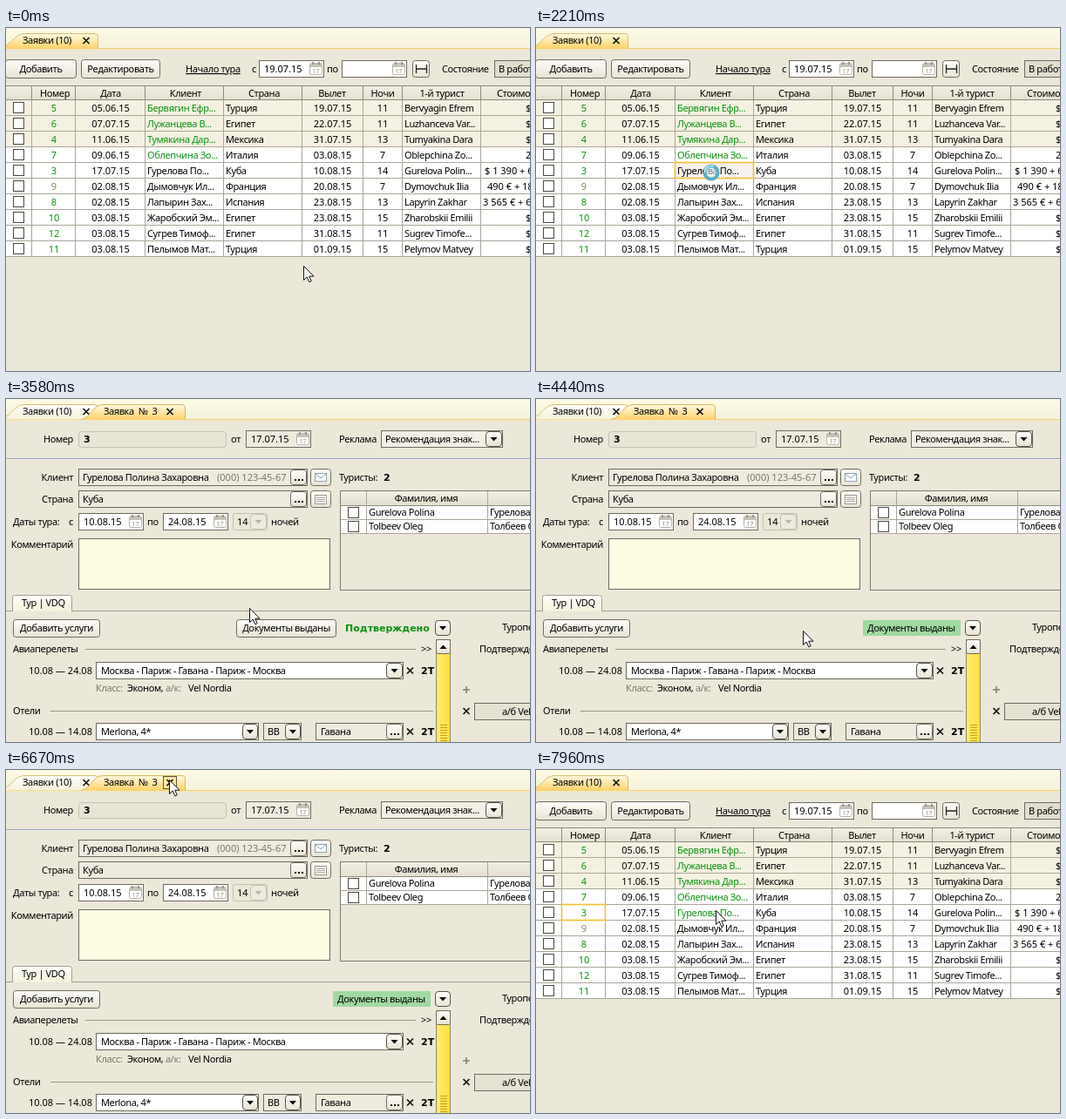
These frames come from a looping animation (601x394 px, 8 s). An HTML page:

```html
<!DOCTYPE html>
<html lang="ru">
<head>
<meta charset="utf-8">
<title>Заявки</title>
<style>
html, body { margin: 0; width: 100%; height: 100%; overflow: hidden; background: #ebe7d9; }
svg { display: block; width: 601px; height: 394px; }
text { font: 11px "Noto Sans", "Open Sans", sans-serif; fill: #000; white-space: pre; }
.w { letter-spacing: -.38px; }
.m { text-anchor: middle; }
.e { text-anchor: end; }
.b { font: bold 11px "DejaVu Sans", sans-serif; letter-spacing: 0; }
.grey { fill: #7b7768; }
.green { fill: #0a920f; }
.olive { fill: #92815a; }
.u { text-decoration: underline; }
.tiny { font-size: 7px; fill: #8a877c; }
</style>
</head>
<body>
<svg id="stage" viewBox="0 0 601 394"></svg>
<script>
const LOOP = 8000;
const BG = '#ebe7d9', EDGE = '#6d6a5f', PALE = '#c6c2b2', GOLD = '#efc02f';

// Drawing helpers
const text = (x, y, s, cls = '') =>
  `<text x="${x}" y="${y}" class="${/[a-zа-я]/i.test(s) ? 'w ' : ''}${cls}">${s}</text>`;
const fill = (x, y, w, h, color) =>
  `<rect x="${x}" y="${y}" width="${w}" height="${h}" fill="${color}"/>`;
const box = (x, y, w, h, color = '#fff', edge = EDGE, r = 0) =>
  `<rect x="${x + .5}" y="${y + .5}" width="${w - 1}" height="${h - 1}" rx="${r}" fill="${color}" stroke="${edge}"/>`;
const path = (d, color = 'none', edge = 'none', width = 1) =>
  `<path d="${d}" fill="${color}" stroke="${edge}" stroke-width="${width}"/>`;
const hline = (x, y, w, color = '#aaa698') => fill(x, y, w, 1, color);
const vline = (x, y, h, color = '#aaa698') => fill(x, y, 1, h, color);
const group = (id, content) => `<g id="${id}">${content}</g>`;

const cross = (x, y, r = 3.5, color = '#111') =>
  path(`M${x - r} ${y - r}l${2 * r} ${2 * r}m0 ${-2 * r}l${-2 * r} ${2 * r}`, 'none', color, 1.7);
const button = (x, y, w, h, label = '', color = 'url(#raised)') =>
  box(x, y, w, h, color, EDGE, 3) + text(x + w / 2, Math.floor(y + h / 2 + 4), label, 'm');
const arrowButton = (x, y, w, h, enabled = true) =>
  box(x, y, w, h, enabled ? 'url(#raised)' : '#eeeadd', enabled ? '#55534a' : PALE, 3.5) +
  path(`M${x + w / 2 - 4} ${y + h / 2 - 2}h8l-4 4.5z`, enabled ? '#000' : '#bab6a8');
const dotsButton = (x, y) => button(x, y, 19, 18) +
  [5, 9, 13].map(d => fill(x + d, y + 11, 2, 2, '#000')).join('');
const checkbox = (x, y) => box(x, y, 13, 13, '#fff', '#4b4a45');
const calendar = (x, y) => box(x, y, 15, 14, '#fff', '#b5b2a7', 2) +
  fill(x + 1, y + 1, 13, 4, '#c5c2b8') + fill(x + 3, y - 1, 2, 3, '#99968b') +
  fill(x + 10, y - 1, 2, 3, '#99968b') + text(x + 7.5, y + 12, '17', 'm tiny');
const dateField = (x, y, date, color) =>
  box(x, y, 75, 20, color) + text(x + 6, y + 14, date) + calendar(x + 58, y + 3);
const closeMark = x => cross(x, 14.5);

const strip = fill(0, 0, 601, 24, 'url(#strip)') + hline(0, 23, 601, '#efcf78') +
  hline(0, 24, 601, '#f6e8bd');
const firstTab = color =>
  path('M-2 23.5V21C8 17 10 6.5 22 6.5H102Q105.5 6.5 105.5 10V23.5', color, '#d6bd73') +
  text(19, 18, 'Заявки (10)') + closeMark(92);

// Booking list
const COLUMNS = [29, 79, 159, 249, 339, 409, 454, 544];
const HEADERS = [[56, 'Номер'], [120, 'Дата'], [206, 'Клиент'], [296, 'Страна'],
  [374, 'Вылет'], [432, 'Ночи'], [500, '1-й турист']];
const BOOKINGS = [
  [5, '05.06.15', 'Бервягин Ефр...', 'Турция', '19.07.15', 11, 'Bervyagin Efrem', 596, '$'],
  [6, '07.07.15', 'Лужанцева В...', 'Египет', '22.07.15', 11, 'Luzhanceva Var...', 596, '$'],
  [4, '11.06.15', 'Тумякина Дар...', 'Мексика', '31.07.15', 13, 'Tumyakina Dara', 596, '$'],
  [7, '09.06.15', 'Облепчина Зо...', 'Италия', '03.08.15', 7, 'Oblepchina Zo...', 596, '2'],
  [3, '17.07.15', 'Гурелова По...', 'Куба', '10.08.15', 14, 'Gurelova Polin...', 549, '$ 1 390 + 6'],
  [9, '02.08.15', 'Дымовчук Ил...', 'Франция', '20.08.15', 7, 'Dymovchuk Ilia', 552, '490 € + 18'],
  [8, '02.08.15', 'Лапырин Зах...', 'Испания', '23.08.15', 13, 'Lapyrin Zakhar', 547, '3 565 € + 6'],
  [10, '03.08.15', 'Жаробский Эм...', 'Египет', '23.08.15', 15, 'Zharobskii Emilii', 596, '$'],
  [12, '03.08.15', 'Сугрев Тимоф...', 'Египет', '31.08.15', 11, 'Sugrev Timofe...', 596, '$'],
  [11, '03.08.15', 'Пелымов Мат...', 'Турция', '01.09.15', 15, 'Pelymov Matvey', 596, '$'],
];

const rowTop = i => 83 + 18 * i;
const rowBack = (_, i) =>
  fill(0, rowTop(i), 601, 17, i < 3 ? '#f4f1e2' : '#fff') + hline(0, rowTop(i) + 17, 601);
const cellMark = (id, x, y, w, color) => group(id,
  `<rect x="${x + .5}" y="${y + .5}" width="${w}" height="18" fill="${color}" stroke="${GOLD}" stroke-width="1.6"/>`);
const rowCells = ([id, date, client, country, flight, nights, tourist, priceX, price], i) => {
  const top = rowTop(i), y = top + 13;
  const marks = cellMark('picked', 159, top - 1, 90, '#f6f1ed') +
    cellMark('visited', 29, top - 1, 50, '#fff');
  return (id === 3 ? marks : '') +
    checkbox(8, top + 2) + text(55, y, id, 'm ' + (id === 9 ? 'olive' : 'green')) +
    text(120, y, date, 'm') +
    `<g${id === 3 ? ' id="client"' : ''}>${text(162, y, client, i < 4 ? 'green' : '')}</g>` +
    text(252, y, country) + text(374.5, y, flight, 'm') + text(432, y, nights, 'm') +
    text(457, y, tourist) + text(priceX, y, price);
};

const listScreen = strip + firstTab('url(#active)') +
  button(-1, 36, 82, 22, 'Добавить') + button(86, 36, 91, 22, 'Редактировать') +
  text(206, 51, 'Начало тура', 'u') + text(282, 51, 'с') + dateField(290, 37, '19.07.15') +
  text(368, 51, 'по') + dateField(385, 37, '') + button(466, 37, 20, 20) +
  path('M470.5 42v10M482.5 42v10M471 47h11', 'none', '#222', 1.3) +
  text(500, 51, 'Состояние') + box(560, 37, 60, 20, '#e2decf') + text(565, 51, 'В работе') +
  fill(0, 66, 601, 17, 'url(#head)') + hline(0, 66, 601, '#8d8a7e') + hline(0, 82, 601, '#8d8a7e') +
  HEADERS.map(([x, s]) => text(x, 79, s, 'm')).join('') + text(563, 79, 'Стоимость') +
  BOOKINGS.map(rowBack).join('') +
  COLUMNS.map(x => vline(x, 66, 17, '#8d8a7e') + vline(x, 83, 180)).join('') +
  BOOKINGS.map(rowCells).join('');

// Booking card
const section = (y, label, x, w) => text(8, y + 4, label) + hline(x, y, w, '#9b988b');
const touristRow = (y, latin, native) => fill(384, y, 217, 15, '#fff') + hline(384, y + 15, 217) +
  checkbox(392, y + 1) + text(416, y + 11, latin) + text(555, y + 11, native);
const label = (y, s) => text(77, y, s, 'e');

const cardScreen = strip + firstTab('url(#idle)') +
  path('M86 23.5C98 22 98 6.5 112 6.5H202Q205.5 6.5 205.5 10V23.5', 'url(#active)', '#d6b75c') +
  text(112, 18, 'Заявка  №  3') +
  group('closeHover', box(180, 7, 16, 15, '#ffe9a6', '#5c5646')) + closeMark(188) +
  hline(0, 68, 601, '#8ba3b8') + hline(0, 69, 601, '#f6f4ea') +
  label(50, 'Номер') + box(83, 37, 170, 19, '#e9e5d6', PALE, 3) + text(89, 50, '3', 'b') +
  text(258, 50, 'от') + dateField(275, 36, '17.07.15', '#efecdf') +
  text(382, 50, 'Реклама') + box(430, 36, 140, 20, '#f2efe4') + text(435, 50, 'Рекомендация знак...') +
  arrowButton(550, 37, 19, 18) +

  label(94, 'Клиент') + box(83, 80, 263, 20, '#eeebde') +
  text(88, 94, 'Гурелова Полина Захаровна') + text(242, 94, '(000) 123-45-67', 'grey') +
  dotsButton(326, 81) + button(349, 80, 24, 20) +
  box(354, 85, 14, 10, '#fff', '#89a3b3') + path('M355 86l6 5 6-5', 'none', '#89a3b3') +
  label(119, 'Страна') + box(83, 105, 263, 20, '#eeebde') + text(88, 119, 'Куба') +
  dotsButton(326, 106) + button(349, 105, 24, 20) +
  box(354, 110, 14, 11, '#fff', '#99968b') +
  [113, 115, 117].map(y => hline(356, y, 10, '#a9a69b')).join('') +
  text(8, 145, 'Даты тура:') + label(145, 'с') + dateField(83, 131, '10.08.15') +
  text(162, 145, 'по') + dateField(180, 131, '24.08.15') +
  box(260, 131, 40, 20, BG, PALE, 2) + text(265, 145, '14') +
  arrowButton(280, 132, 19, 18, false) + text(304, 145, 'ночей') +
  label(171, 'Комментарий') + box(83, 160, 289, 59, '#fdfce2') +

  text(382, 94, 'Туристы:') + text(433, 94, '2', 'b') +
  box(383, 105, 230, 115, BG, '#7d7a6e') + fill(384, 106, 217, 16, 'url(#head)') +
  hline(384, 122, 217, '#8d8a7e') + text(482, 118, 'Фамилия, имя', 'm') +
  touristRow(123, 'Gurelova Polina', 'Гурелова П') + touristRow(139, 'Tolbeev Oleg', 'Толбеев Ол') +
  vline(413, 106, 49) + vline(552, 106, 49) +

  hline(0, 243, 601, '#a29f92') +
  path('M7.5 244V228.5Q7.5 225.5 10.5 225.5H72.5Q75.5 225.5 75.5 228.5V244', 'url(#idle)', '#a29f92') +
  text(18, 238, 'Тур | VDQ') + button(8, 253, 100, 21, 'Добавить услуги') +
  group('pending', button(264, 253, 115, 21, 'Документы выданы') +
    group('issueHover', button(264, 253, 115, 21, 'Документы выданы', '#fff1bd')) +
    group('issueDown', button(264, 253, 115, 21, 'Документы выданы', '#dcd6bf')) +
    text(389, 267, 'Подтверждено', 'b green')) +
  group('issued', fill(375, 254, 112, 18, '#a0d9a2') + text(380, 267, 'Документы выданы')) +
  arrowButton(492, 254, 18, 18) +
  text(569, 266, 'Туроператор') + text(543, 291, 'Подтверждение') +

  section(287, 'Авиаперелеты', 91, 379) + text(476, 291, '&gt;&gt;') +
  text(26, 316, '10.08 — 24.08') + box(103, 302, 353, 20) +
  text(109, 316, 'Москва - Париж - Гавана - Париж - Москва') + arrowButton(436, 303, 19, 18) +
  cross(463.5, 312) + text(476, 316, '2Т', 'b') +
  text(103, 336, 'Класс:', 'grey') + text(139, 336, 'Эконом,') + text(183, 336, 'а/к:', 'grey') +
  text(209, 336, 'Vel Nordia') +
  section(358, 'Отели', 51, 439) + text(26, 386, '10.08 — 14.08') +
  box(103, 372, 187, 20) + text(109, 386, 'Merlona, 4*') + arrowButton(271, 373, 18, 18) +
  box(295, 372, 44, 20, '#eeebde') + text(300, 386, 'BB') + arrowButton(320, 373, 18, 18) +
  box(355, 372, 101, 20, '#eeebde') + text(361, 386, 'Гавана') + dotsButton(436, 373) +
  cross(463.5, 382) + text(476, 386, '2Т', 'b') +

  box(493, 276, 17, 130, 'url(#thumb)', '#8f8a62') + box(493, 276, 17, 17, 'url(#raised)', EDGE, 2) +
  path('M497.5 287h8l-4-4.5z', '#000') +
  Array.from({ length: 7 }, (_, i) => hline(498, 374 + 3 * i, 8, '#c49f1e')).join('') +
  path('M524 334h8M528 330v8', 'none', '#84806f', 1.6) + cross(528, 358.5) +
  box(537, 349, 80, 20, '#e6e2d3') + text(569, 363, 'а/б Vel');

const pointers =
  group('arrow', path('M.5 .5V16.5L4.2 13L6.8 18.8L9.2 17.7L6.7 12.2H12Z', '#fff', '#111')) +
  group('beam', path('M-3 -7.5h2.5l.5 .5 .5-.5H3M-3 8.5h2.5l.5-.5 .5 .5H3M0 -7V8', 'none', '#111', 1.2)) +
  group('ring', '<circle r="7.5" fill="#e4f3f6" fill-opacity=".55" stroke="#58afc4" stroke-width="4"/>' +
    path('M-7.5 0A7.5 7.5 0 0 1 3 -6.9', 'none', '#a5dbe5', 2.4));

const gradient = (id, from, to, across = false) =>
  `<linearGradient id="${id}" x2="${across ? 1 : 0}" y2="${across ? 0 : 1}">` +
  `<stop stop-color="${from}"/><stop offset="1" stop-color="${to}"/></linearGradient>`;

document.getElementById('stage').innerHTML = '<defs>' +
  gradient('raised', '#fefdf9', '#e7e3d4') + gradient('strip', '#fdfbe4', '#f5f1da') +
  gradient('active', '#fff9e2', '#ffd26a') + gradient('idle', '#fffffa', '#f5f1db') +
  gradient('head', '#f2efe4', '#e4e0d0') + gradient('thumb', '#ffec72', '#ffdf3c', true) + '</defs>' +
  fill(0, 0, 601, 394, BG) + group('list', listScreen) +
  group('card', cardScreen) + group('pointer', pointers);

// Pointer moves: first step, last step, step count, destination, easing
const smooth = f => f * f * (3 - 2 * f), linear = f => f, speedUp = f => f ** 1.3;
const MOVES = [
  [590, 1550, 8, 207, 167, smooth],
  [1670, 1800, 2, 201, 166, linear],
  [2330, 2330, 1, 203, 166, linear],
  [3040, 3730, 6, 306, 266, smooth],
  [5280, 6090, 7, 187, 11, smooth],
  [6820, 6820, 1, 189, 18, linear],
  [6970, 7390, 4, 195, 66, speedUp],
  [7540, 7960, 4, 206, 161, linear],
];

function pointerAt(t) {
  let x = 341, y = 273;
  for (const [first, last, count, toX, toY, ease] of MOVES) {
    if (t < first) break;
    const gap = (last - first) / (count - 1) || 1;
    const f = ease(Math.min(count, Math.floor((t - first) / gap + 1e-6) + 1) / count);
    x += (toX - x) * f;
    y += (toY - y) * f;
  }
  return [Math.round(x), Math.round(y)];
}

const byId = id => document.getElementById(id);
const show = (id, on) => byId(id).setAttribute('display', on ? 'inline' : 'none');
const clientName = byId('client').firstElementChild;

function render(t) {
  const [x, y] = pointerAt(t);
  const within = (l, top, r, bottom) => x >= l && x < r && y >= top && y < bottom;
  const card = t >= 2330 && t < 6820, issued = t >= 4440;
  const busy = t >= 2070 && t < 2330;
  const beam = card && within(83, 160, 372, 219);

  show('list', !card);
  show('card', card);
  show('picked', t >= 1800 && t < 2330);
  show('visited', t >= 6820);
  clientName.classList.toggle('green', t >= 6820);

  show('pending', !issued);
  show('issued', issued);
  show('issueHover', within(264, 253, 379, 274));
  show('issueDown', t >= 4290);
  show('closeHover', within(180, 7, 196, 22));

  byId('pointer').setAttribute('transform', `translate(${x} ${y})`);
  show('ring', busy);
  show('beam', beam);
  show('arrow', !busy && !beam);
}

const start = performance.now();
function tick() {
  render((performance.now() - start) % LOOP);
  requestAnimationFrame(tick);
}
tick();
</script>
</body>
</html>
```
